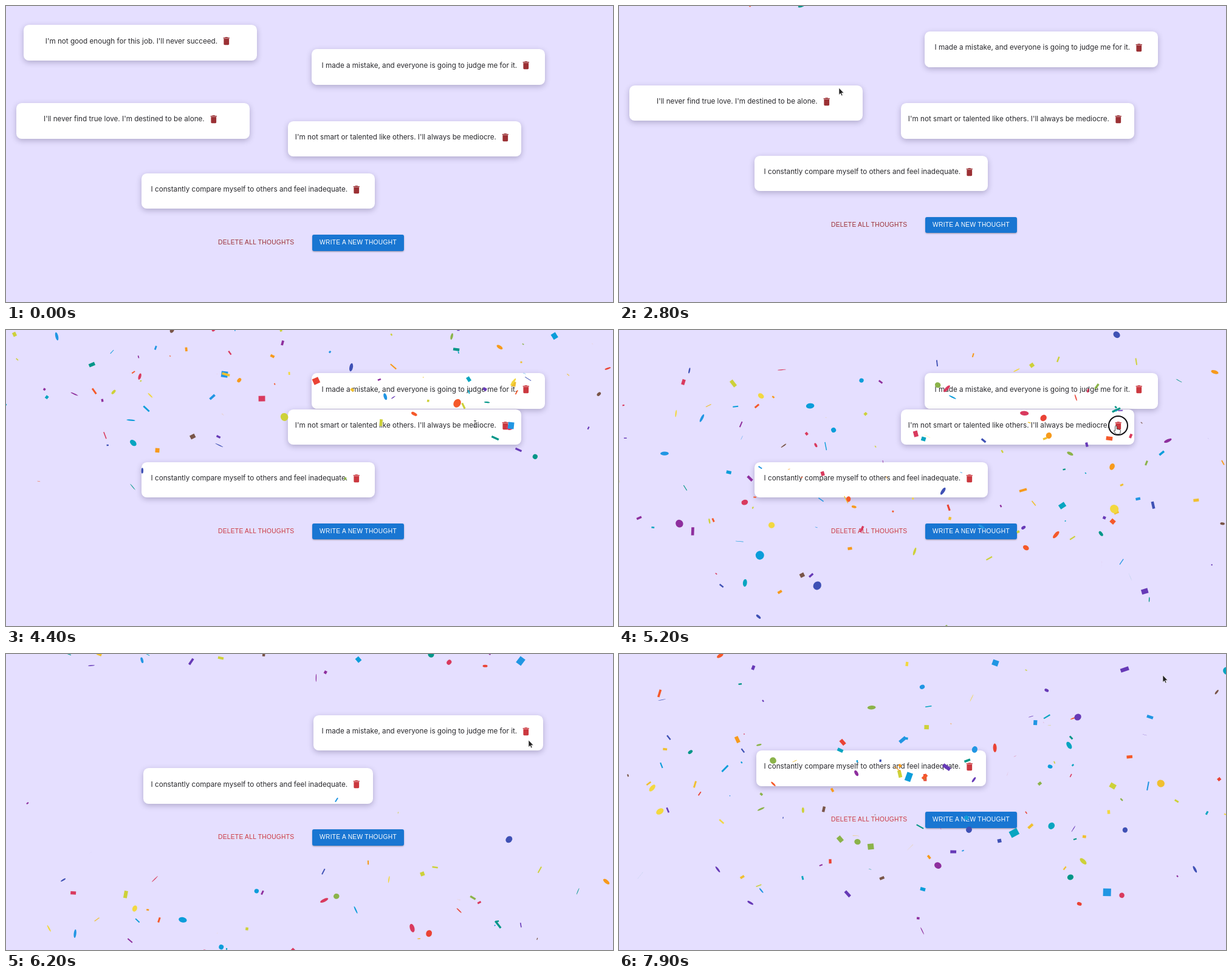
Recreate the animation shown at these times as an HTML page with a canvas. Size 999x488 px, loop 8 s.

```html
<!DOCTYPE html>
<html lang="en">
<head>
<meta charset="utf-8">
<title>Thoughts</title>
<style>
  html, body { margin: 0; width: 100%; height: 100%; overflow: hidden; background: #e5dfff; }
  #stage { position: relative; width: 999px; height: 488px; overflow: hidden; --red: #9b3034; }
  .card {
    position: absolute; box-sizing: border-box; height: 58.4px; padding-top: 12.2px;
    border-radius: 8.8px; background: #fff; box-shadow: 0 3px 10px rgba(25, 15, 55, .25);
    font: 11.68px/17px Inter, sans-serif; color: #2a2a2e; text-align: center; white-space: nowrap;
  }
  .bin {
    display: inline-flex; align-items: center; justify-content: center;
    width: 29.2px; height: 29.2px; border-radius: 50%; vertical-align: middle;
  }
  .bin svg { width: 17.5px; height: 17.5px; fill: var(--red); }
  .bin.focus { outline: 2px solid #101014; outline-offset: -.6px; }
  #bar { position: absolute; left: 0; font: 10.22px/26.6px "Liberation Sans", Arial, sans-serif; letter-spacing: .02857em; white-space: nowrap; }
  #bar span { position: absolute; top: 0; }
  #clear { left: 349px; color: var(--red); }
  #write {
    left: 504px; width: 151px; height: 26.6px; text-align: center; color: #fff;
    background: #1976d2; border-radius: 2.9px;
    box-shadow: 0 2px 2px -1px rgba(0, 0, 0, .2), 0 1px 3px rgba(0, 0, 0, .2);
  }
  canvas, #cursor { position: absolute; left: 0; top: 0; }
  #cursor { overflow: visible; width: 1px; height: 1px; }
</style>
</head>
<body>
<div id="stage">
  <div id="bar"><span id="clear">DELETE ALL THOUGHTS</span><span id="write">WRITE A NEW THOUGHT</span></div>
  <canvas id="confetti" width="999" height="488"></canvas>
  <svg id="cursor">
    <path id="arrow" d="M0 0v11.5l2.6-2.4 1.7 3.9 1.8-.8-1.7-3.8h3.6z" fill="#222" stroke="#fff" stroke-width=".6"/>
    <path id="hand" d="M-1.4 1.2a1.3 1.3 0 0 1 2.6 0v4l5 1.1q1.5.4 1.2 2l-.7 4q-.3 1.5-1.5 1.5H1q-1 0-1.6-1l-3.2-4.4q.5-1.6 2.4-.2z" fill="#fff" stroke="#333" stroke-width=".9"/>
    <path id="beam" d="M-2-5.5h4M0-5.5v11M-2 5.5h4" fill="none" stroke="#555"/>
  </svg>
</div>
<script>
const LOOP = 8000, STEP = 100, SCALE = .73;
const $ = id => document.getElementById(id);
const stage = $('stage'), bar = $('bar'), ctx = $('confetti').getContext('2d');

// click: focus ring appears; gone: card leaves the list
const cards = [
  { x: 29, click: 2500, gone: 2700, text: "I'm not good enough for this job. I'll never succeed." },
  { x: 503, click: 6500, gone: 6850, text: 'I made a mistake, and everyone is going to judge me for it.' },
  { x: 17, click: 3100, gone: 3400, text: "I'll never find true love. I'm destined to be alone." },
  { x: 464, click: 5000, gone: 5500, text: "I'm not smart or talented like others. I'll always be mediocre." },
  { x: 223, click: LOOP, gone: LOOP, text: 'I constantly compare myself to others and feel inadequate.' }
];

// Card tops and button top for each stretch of time
const layouts = [
  { from: 0, tops: [31.4, 71.4, 160.2, 189.5, 276], bar: 377 },
  { from: 2700, tops: [0, 42.2, 131, 160.3, 246.8], bar: 347.8 },
  { from: 3400, tops: [0, 71.4, 0, 131.1, 217.6], bar: 318.6 },
  { from: 5500, tops: [0, 100.6, 0, 0, 188.4], bar: 289.4, inset: 3 },
  { from: 6850, tops: [0, 0, 0, 0, 159.2], bar: 260.2, inset: 3 }
];

// time, x, y, shape until the next stop
const path = [
  [2300, 391, 452, 'arrow'], [2500, 362, 58, 'hand'], [2600, 362, 60, 'hand'],
  [2800, 362, 135, 'arrow'], [3000, 342, 154, 'hand'], [3500, 342, 156, 'arrow'],
  [4400, 772, 155, 'beam'], [4700, 818, 158, 'hand'], [5600, 818, 158, 'arrow'],
  [6200, 860, 142, 'arrow'], [6400, 859, 136, 'hand'], [7000, 859, 136, 'arrow'],
  [7900, 895, 35, 'arrow']
];

const colors = ['#ea4335', '#d93a5e', '#8e2f9e', '#673ab7', '#3f51b5', '#2196e3', '#0b9dda', '#07a5c0',
  '#009688', '#8bb34a', '#cdd139', '#f2d840', '#f0c030', '#f79a1c', '#f5592a', '#795548'];
const bursts = [2700, 5530];

for (const card of cards) {
  card.el = document.createElement('div');
  card.el.className = 'card';
  card.el.textContent = card.text;
  card.bin = document.createElement('span');
  card.bin.className = 'bin';
  card.bin.innerHTML = '<svg viewBox="0 0 24 24"><path d="M6 19c0 1.1.9 2 2 2h8c1.1 0 2-.9 2-2V7H6v12zM19 4h-3.5l-1-1h-5l-1 1H5v2h14V4z"/></svg>';
  card.el.append(card.bin);
  stage.insertBefore(card.el, bar);
}

function seeded(s) {
  return () => {
    s = s + 0x6D2B79F5 | 0;
    let r = Math.imul(s ^ s >>> 15, 1 | s);
    r = r + Math.imul(r ^ r >>> 7, 61 | r) ^ r;
    return ((r ^ r >>> 14) >>> 0) / 4294967296;
  };
}

const rnd = seeded(41);
const range = (a, b) => a + (b - a) * rnd();
const pieces = bursts.flatMap(start => Array.from({ length: 170 }, () => ({
  start,
  x: range(0, 999),
  vx: range(-4, 4),
  // Most pieces get a middling upward throw
  vy: range(-5.3, 0) + range(-5.3, 0),
  w: range(5, 20) * SCALE,
  h: range(5, 20) * SCALE,
  r: range(5, 10) * SCALE,
  angle: range(0, 2 * Math.PI),
  spin: range(-.2, .2),
  flip: rnd(),
  shape: Math.floor(range(0, 3)),
  color: colors[Math.floor(range(0, colors.length))]
})));

// Triangle wave from -1 to 1
const wave = p => 1 - 4 * Math.abs(p % 1 - .5);

function drawPiece(p, t) {
  const n = (t - p.start) * .06;
  if (n < 0) return;
  // Constant gravity against friction: speed tends to 10 per tick
  const drag = 100 * (1 - Math.pow(.99, n));
  const x = p.x + SCALE * p.vx * drag;
  const y = SCALE * (10 * n + (p.vy - 10) * drag);
  if (y < -20 || y > 508) return;
  ctx.save();
  ctx.translate(x, y);
  ctx.rotate(p.angle + p.spin * n);
  ctx.scale(1, wave(p.flip + n / 40));
  ctx.fillStyle = p.color;
  ctx.beginPath();
  if (p.shape === 0) ctx.arc(0, 0, p.r, 0, 2 * Math.PI);
  else {
    const w = p.shape === 1 ? p.w : p.w / 3;
    ctx.rect(-w / 2, -p.h / 2, w, p.h);
  }
  ctx.fill();
  ctx.restore();
}

function placeCards(t) {
  const now = layouts.findLast(l => t >= l.from), inset = now.inset || 0;
  cards.forEach((card, i) => {
    const s = card.el.style;
    s.display = t < card.gone ? '' : 'none';
    s.left = card.x + inset + 'px';
    s.width = 384 - 2 * inset + 'px';
    s.top = now.tops[i] + 'px';
    card.bin.classList.toggle('focus', t >= card.click && t < card.gone);
  });
  bar.style.top = now.bar + 'px';
  stage.style.setProperty('--red', t < 2900 ? '#9b3034' : '#cb383f');
}

function placeCursor(t) {
  const i = path.findLastIndex(k => t >= k[0]);
  const cursor = $('cursor');
  cursor.style.display = i < 0 ? 'none' : '';
  if (i < 0) return;
  const a = path[i], b = path[i + 1] || a;
  const u = a === b ? 0 : (t - a[0]) / (b[0] - a[0]);
  const e = u * u * (3 - 2 * u);
  const x = a[1] + (b[1] - a[1]) * e, y = a[2] + (b[2] - a[2]) * e;
  cursor.style.transform = `translate(${x}px, ${y}px)`;
  for (const id of ['arrow', 'hand', 'beam']) $(id).style.display = id === a[3] ? '' : 'none';
}

let last = -1;
function tick() {
  const t = Math.floor(performance.now() % LOOP / STEP) * STEP;
  if (t !== last) {
    last = t;
    placeCards(t);
    placeCursor(t);
    ctx.clearRect(0, 0, 999, 488);
    for (const p of pieces) drawPiece(p, t);
  }
  requestAnimationFrame(tick);
}
tick();
</script>
</body>
</html>
```
